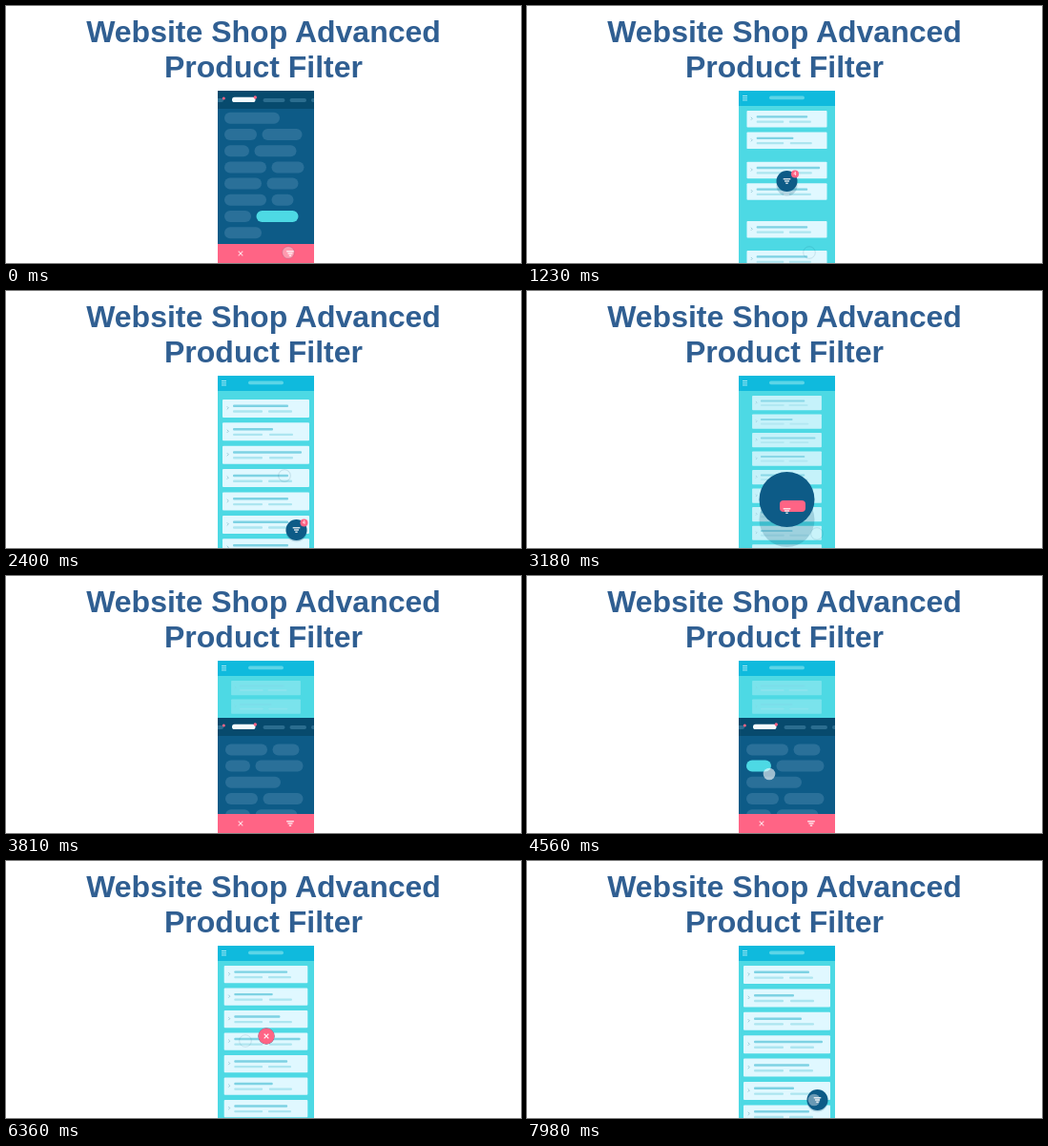
These frames come from a looping animation (540 px wide and 270 px high, 8000 ms). An HTML page with a canvas:

```html
<!DOCTYPE html>
<html lang="en">
<head>
<meta charset="utf-8">
<title>Product filter</title>
<style>
  html, body { margin: 0; width: 100%; height: 100%; overflow: hidden; background: #fff; }
  canvas { position: absolute; left: 0; top: 0; width: 540px; height: 270px; }
  h1 {
    position: absolute; left: 0; top: 9px; width: 540px; margin: 0;
    font: bold 32px/37px "Liberation Sans", Arial, sans-serif;
    color: #305f92; text-align: center;
  }
</style>
</head>
<body>
<canvas></canvas>
<h1>Website Shop Advanced<br>Product Filter</h1>
<script>
const LOOP = 8000;
const canvas = document.querySelector('canvas');
const ctx = canvas.getContext('2d');
const ratio = window.devicePixelRatio || 1;
canvas.width = 540 * ratio;
canvas.height = 270 * ratio;

const BLUE = '#0d5b87', NAVY = '#074a6d', PINK = '#ff6485', AQUA = '#4dd9e4', SKY = '#0fbadd';

const rect = (x, y, w, h, r = 0) => ({ x, y, w, h, r });
const disc = (x, y, r) => rect(x - r, y - r, 2 * r, 2 * r, r);
const spot = (x, y) => ({ x, y });

const PHONE = rect(222, 89, 101, 181);
const SHEET = rect(222, 149, 101, 121);
const BAR = rect(222, 250, 101, 20);
const APPLY = spot(298, 260), DOCK = spot(304.5, 251), MIDDLE = spot(272.5, 184);
const BUTTON = disc(DOCK.x, DOCK.y, 11), CLOSE = disc(273, 184, 8.5);

// Each pose: blue panel, pink accent, filter icon place, shadow drop.
const pose = (panel, accent, icon, drop) => ({ panel, accent, icon, drop: { y: drop } });
const POSES = {
  full: pose(PHONE, BAR, APPLY, 0),
  middle: pose(disc(MIDDLE.x, MIDDLE.y, 11), disc(281, 176.5, 4), MIDDLE, 4.5),
  docked: pose(BUTTON, disc(312.5, 243.5, 4), DOCK, 1.5),
  ball: pose(disc(272.5, 219, 29), rect(265, 220, 27, 12, 4), spot(272.5, 231), 21),
  sheet: pose(SHEET, BAR, APPLY, 0),
  flooded: pose(SHEET, SHEET, APPLY, 0),
  close: pose(CLOSE, CLOSE, DOCK, 0.5),
  idle: pose(BUTTON, disc(DOCK.x, DOCK.y, 0), DOCK, 1.5)
};

// Title length of each card; a capital marks one the filter rejects.
const CARD_ORDER = 'lsMwlSLlSllsl';
const TITLE = { l: 58, s: 42, m: 50, w: 72 };
const PILL_ROWS = '44 28,26 50,58,34 42,26 44,44 34,39 33,44 23,28 44,39'
  .split(',').map(row => row.split(' ').map(Number));

function ramp(t, from, to) {
  const u = Math.min(1, Math.max(0, (t - from) / (to - from)));
  return u * u * (3 - 2 * u);
}

function mix(a, b, u) {
  if (typeof a === 'number') return a + (b - a) * u;
  return Object.fromEntries(Object.keys(a).map(key => [key, mix(a[key], b[key], u)]));
}

function poseAt(t) {
  let current = POSES.full;
  const go = (name, from, to) => {
    if (t > from) current = mix(current, POSES[name], ramp(t, from, to));
  };
  go('middle', 400, 1000);
  go('docked', 1330, 1750);
  go('ball', 2930, 3180);
  go('sheet', 3180, 3500);
  go('flooded', 5100, 5250);
  go('close', 5250, 5750);
  go('idle', 6500, 6950);
  return current;
}

function trace({ x, y, w, h, r }) {
  ctx.beginPath();
  ctx.roundRect(x, y, w, h, Math.max(0, Math.min(r, w / 2, h / 2)));
}

function fill(color, shape) {
  trace(shape);
  ctx.fillStyle = color;
  ctx.fill();
}

const box = (color, ...sides) => fill(color, rect(...sides));
const dot = (color, x, y, r) => fill(color, disc(x, y, r));

function line(color, width, ...points) {
  ctx.beginPath();
  points.forEach(p => ctx.lineTo(p.x, p.y));
  ctx.strokeStyle = color;
  ctx.lineWidth = width;
  ctx.stroke();
}

function scoped(alpha, draw) {
  ctx.save();
  ctx.globalAlpha *= alpha;
  draw();
  ctx.restore();
}

function drawCard(length) {
  box('#e0f8ff', -45.5, 0, 91, 19, 1);
  line('#86bfd0', 0.8, spot(-40.8, 7.4), spot(-39.2, 9), spot(-40.8, 10.6));
  box('#7dd2e3', -34.5, 5.6, length, 2.5, 1);
  box('#ace5f0', -34.5, 11.4, 31, 2.4, 1);
  box('#ace5f0', length === TITLE.l ? 2.5 : 3.5, 11.4, 25, 2.4, 1);
}

function drawList(t) {
  const filtered = t < 4500;
  const grow = ramp(t, 1030, 1377) - ramp(t, 2950, 3180) + ramp(t, 6110, 6457);
  const scale = 0.8 + 0.2 * grow;
  const gap = filtered ? 1 - ramp(t, 1030, 1377) : 1;
  const rejectedAlpha = filtered ? 1 - ramp(t, 700, 1000) : 1;
  const pull = 20 * (ramp(t, 1850, 2200) - ramp(t, 2200, 2480));
  const alpha = 0.3 + 0.7 * ramp(t, 400, 900) - 0.18 * ramp(t, 2950, 3180)
    - 0.52 * ramp(t, 3180, 3500) + 0.7 * ramp(t, 5250, 5750);
  scoped(alpha, () => {
    ctx.translate(272.5, 110 + pull);
    ctx.scale(scale, scale);
    for (const kind of CARD_ORDER) {
      const rejected = kind < 'a';
      scoped(rejected ? rejectedAlpha : 1, () => drawCard(TITLE[kind.toLowerCase()]));
      ctx.translate(0, 24.4 * (rejected ? gap : 1));
    }
  });
}

function drawHeader() {
  box(SKY, 222, 89, 101, 16);
  for (let i = 0; i < 3; i++) box('#a5e9f4', 226, 94 + i * 2.2, 5, 1);
  box('#5bd5e7', 254, 94.6, 37, 3.6, 1.8);
}

function drawPanelContent(t) {
  const full = t < 2000;
  const top = full ? 89 : 149;
  const firstRow = full ? 77.4 : 176.4;
  const selected = full ? '8,1' : t > 4430 ? '1,0' : '';
  PILL_ROWS.forEach((row, r) => {
    let x = full ? 229 : 230;
    row.forEach((width, i) => {
      box(selected === `${r},${i}` ? AQUA : '#2a7099', x, firstRow + r * 17.2, width, 12, 6);
      x += width + 5.5;
    });
  });
  box(NAVY, 222, top, 101, 19);
  const tab = (x, width) => box('#2b6d8f', x, top + 8, width, 4, 2);
  tab(216, 12);
  tab(269.5, 23);
  tab(297.5, 17.5);
  tab(320, 12);
  box('#f2fcff', 237, top + 6.8, 24.5, 5.2, 2.6);
  dot(PINK, 228.3, top + 8, 1.5);
  dot(PINK, 261.3, top + 7, 1.7);
}

function drawPanel(t, { panel, accent, drop }) {
  if (drop.y) fill('rgba(0, 75, 110, 0.2)', { ...panel, y: panel.y + drop.y });
  fill(BLUE, panel);
  const visible = 1 - ramp(t, 400, 600) + ramp(t, 3350, 3700) - ramp(t, 5100, 5250);
  scoped(visible, () => {
    trace(panel);
    ctx.clip();
    drawPanelContent(t);
  });
  fill(PINK, accent);
}

function drawIcons(t, { accent, icon }) {
  scoped(1 - ramp(t, 5100, 5250) + ramp(t, 6550, 6900), () => {
    const bar = (width, dy) => box('#fff', icon.x - width / 2, icon.y + dy, width, 1.2);
    bar(7.6, -2.8);
    bar(5, -0.6);
    bar(2.4, 1.6);
  });

  const cross = mix(spot(246, 260), spot(273, 184), ramp(t, 5250, 5750));
  const crossAlpha = 0.7 * (1 - ramp(t, 400, 550) + ramp(t, 3400, 3650))
    + 0.3 * ramp(t, 5250, 5750) - ramp(t, 6500, 6700);
  scoped(Math.max(0, crossAlpha), () => {
    ctx.translate(cross.x, cross.y);
    line('#fff', 1.2, spot(-2.3, -2.3), spot(2.3, 2.3));
    line('#fff', 1.2, spot(-2.3, 2.3), spot(2.3, -2.3));
  });

  scoped(0.9 * (ramp(t, 900, 1050) - ramp(t, 2930, 3000)), () => {
    ctx.font = 'bold 5px "Liberation Sans", Arial, sans-serif';
    ctx.textAlign = 'center';
    ctx.fillStyle = '#fff';
    ctx.fillText('4', accent.x + accent.w / 2, accent.y + accent.h / 2 + 1.8);
  });
}

function drawPointer(t) {
  const touch = (x, y, strength, from, pressed, released, gone, outline = 0) => {
    if (t < from || t > gone) return;
    const shown = ramp(t, from, pressed);
    const glow = strength * shown * (1 - ramp(t, released, released + (gone - released) * 0.7));
    const ring = outline * shown * (1 - ramp(t, released + (gone - released) * 0.6, gone));
    dot(`rgba(255, 255, 255, ${glow})`, x, y, 6.3);
    ctx.strokeStyle = `rgba(0, 75, 105, ${ring})`;
    ctx.lineWidth = 1;
    ctx.stroke();
  };
  touch(296, 259, 0.35, -200, -100, 500, 1550, 0.15);
  touch(292, mix(160, 194, ramp(t, 1850, 2200)), 0.45, 1700, 1850, 2200, 2550, 0.15);
  touch(304, 255, 0.45, 2700, 2850, 3000, 3350, 0.12);
  touch(254, 208, 0.6, 4200, 4450, 4600, 4850);
  touch(246, 260, 0.4, 4880, 5050, 5100, 5300);
  touch(251, 189, 0.05, 5900, 6300, 6400, 6600, 0.12);
  touch(301, 251, 0.38, 7500, 7920, LOOP, LOOP + 200);
}

function render(now) {
  const t = now % LOOP;
  const current = poseAt(t);
  ctx.setTransform(ratio, 0, 0, ratio, 0, 0);
  ctx.clearRect(0, 0, 540, 270);
  scoped(1, () => {
    trace(PHONE);
    ctx.clip();
    fill(AQUA, PHONE);
    drawList(t);
    drawHeader();
    drawPanel(t, current);
    drawIcons(t, current);
    drawPointer(t);
  });
}

const start = performance.now();
function tick() {
  render(performance.now() - start);
  requestAnimationFrame(tick);
}
tick();
</script>
</body>
</html>
```
